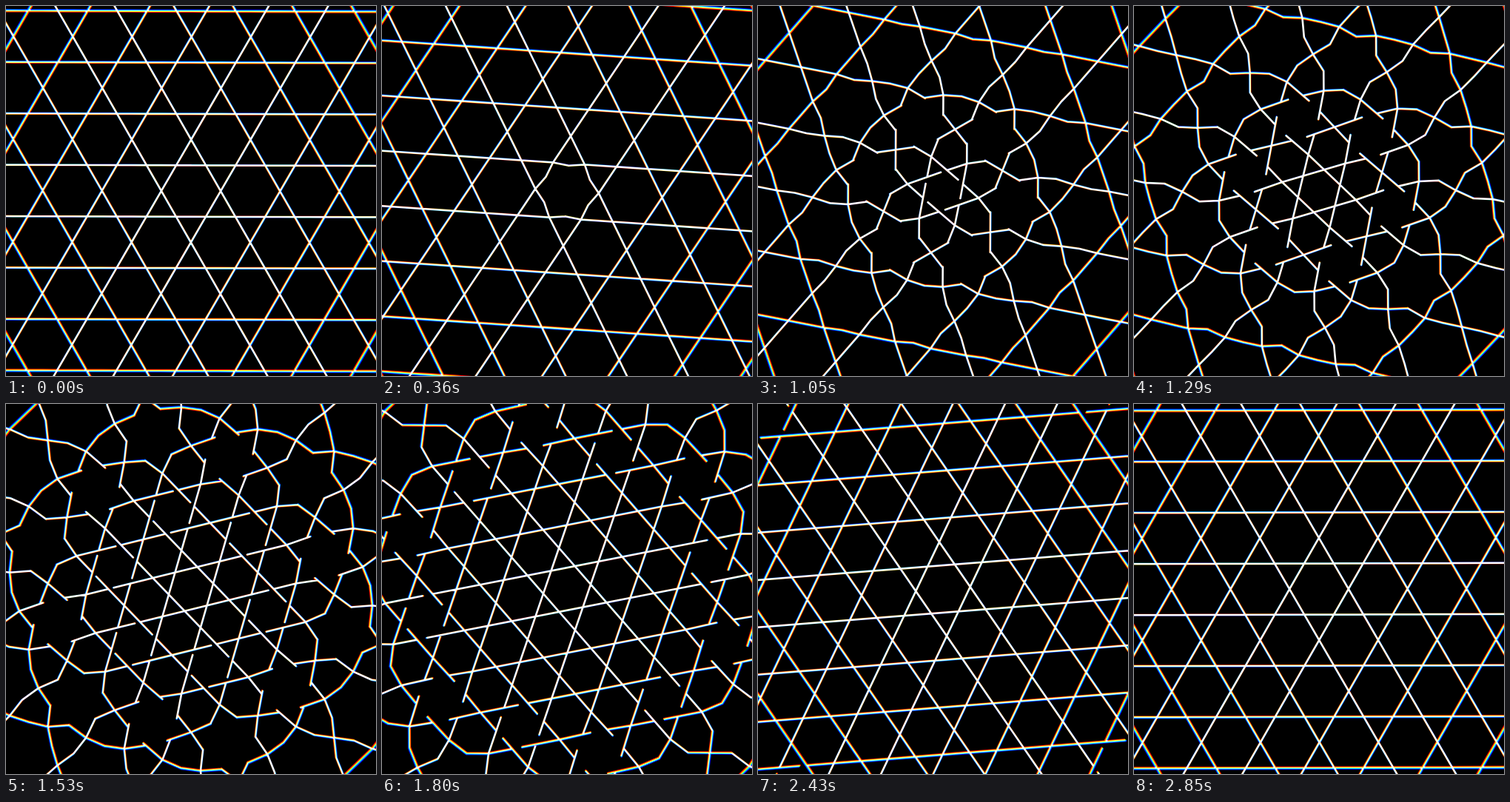
These frames come from a looping animation (500x500 px, 2880 ms). An HTML page with a canvas:

```html
<!DOCTYPE html>
<html>
<head>
<meta charset="utf-8">
<style>
html, body { margin: 0; width: 100%; height: 100%; overflow: hidden; background: #000; }
canvas { display: block; width: 500px; height: 500px; }
</style>
</head>
<body>
<canvas id="c" width="500" height="500"></canvas>
<script>
const ctx = document.getElementById('c').getContext('2d');
const LOOP = 2880, STEPS = 96, EDGE = 40, WEIGHT = 2.6, SPLIT = 0.004;
const ROOT3 = Math.sqrt(3), DEG = Math.PI / 180;
const CHANNELS = [['#f00', 1 - SPLIT], ['#0f0', 1], ['#00f', 1 + SPLIT]];

function smooth(u) {
  u = Math.min(1, Math.max(0, u));
  return u * u * (3 - 2 * u);
}

// Hexagon centres of the trihexagonal lattice, in edge lengths.
const hexes = [];
for (let i = -6; i <= 6; i++) {
  for (let j = -6; j <= 6; j++) {
    const x = 2 * i + j, y = ROOT3 * j, d = Math.hypot(x, y);
    if (d < 10.5) hexes.push({ x, y, d });
  }
}

function arm(path, x, y, angle, length) {
  path.moveTo(x, y);
  path.lineTo(x + length * Math.cos(angle), y + length * Math.sin(angle));
}

// Each edge splits into two arms that fold into the hexagon;
// one of them then stretches until it meets the arm opposite.
function addHex(path, hex, t, size) {
  const { x, y, d } = hex;
  const fold = 30 * DEG * smooth((t - 0.06 * d - 0.003 * d * d) / 0.4);
  const grow = smooth((t - 0.18 - 0.068 * d - 0.004 * d * d) / 0.3);
  const short = 0.5 / Math.cos(fold);
  const long = short + grow / ROOT3;
  for (let k = 0; k < 6; k++) {
    const a = k * 60 * DEG, b = a + 60 * DEG;
    arm(path, (x + Math.cos(a)) * size, (y + Math.sin(a)) * size,
      a + 120 * DEG + fold, long * size);
    arm(path, (x + Math.cos(b)) * size, (y + Math.sin(b)) * size,
      a - 60 * DEG - fold, short * size);
  }
}

function draw(t) {
  const zoom = Math.pow(ROOT3, t), size = EDGE * zoom;
  const reach = 360 / size + 1.1;
  ctx.setTransform(1, 0, 0, 1, 0, 0);
  ctx.globalCompositeOperation = 'source-over';
  ctx.fillStyle = '#000';
  ctx.fillRect(0, 0, 500, 500);
  ctx.globalCompositeOperation = 'lighter';
  ctx.lineWidth = WEIGHT;
  ctx.lineCap = 'round';
  ctx.translate(250, 250);
  ctx.rotate(30 * DEG * t);
  for (const [color, scale] of CHANNELS) {
    const path = new Path2D();
    for (const hex of hexes) {
      if (hex.d < reach) addHex(path, hex, t, size * scale);
    }
    ctx.strokeStyle = color;
    ctx.stroke(path);
  }
}

const start = performance.now();
function tick() {
  const ms = Math.max(0, performance.now() - start) % LOOP;
  draw((Math.floor(ms * STEPS / LOOP) + 0.5) / STEPS);
  requestAnimationFrame(tick);
}
tick();
</script>
</body>
</html>
```
